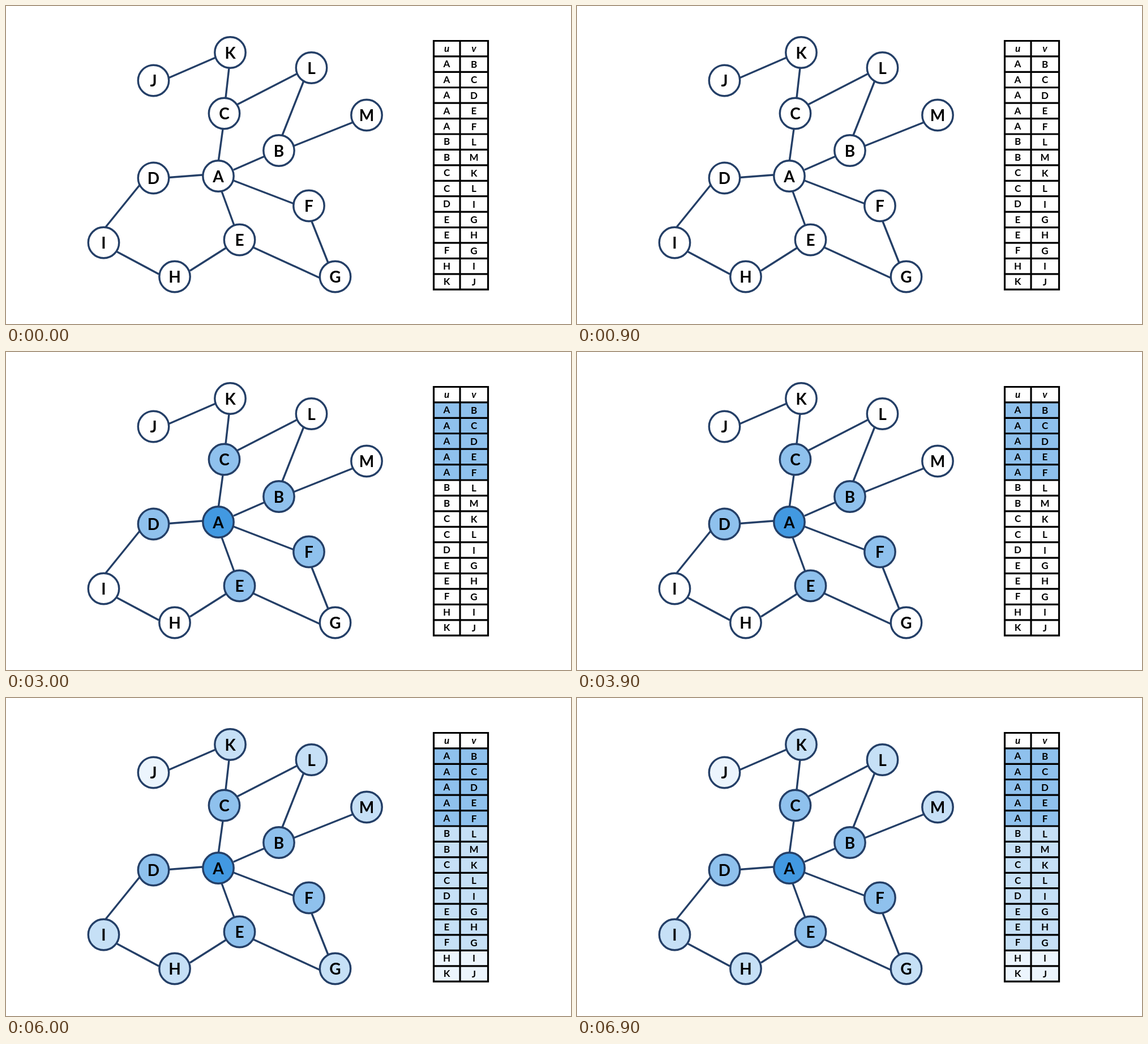
Animation of 998x561 px, one loop 7.5 s. Source, as an HTML page:

```html
<!DOCTYPE html>
<html lang="en">
<head>
<meta charset="utf-8">
<title>Breadth-first search</title>
<style>
  html, body { margin: 0; width: 100%; height: 100%; overflow: hidden; background: #fff; }
  svg { display: block; width: 100%; height: 100%; }
  text { font: 700 28px Lato, sans-serif; text-anchor: middle; }
  .cell { font-size: 17px; }
  .head { font-style: italic; }
  .ink { stroke: #243f67; stroke-width: 3.4; }
  .grid { stroke: #000; stroke-width: 3.2; fill: none; }
</style>
</head>
<body>
<svg id="stage" viewBox="0 0 998 561"></svg>
<script>
const STEP = 1500, STEPS = 5;
const LEVEL_FILLS = ['#4299e1', '#8fc1ed', '#c6e0f6', '#ecf5fd'];
const LEVELS = ['A', 'BCDEF', 'GHIKLM', 'J'];

const nodes = {
  A: [375, 300], B: [482, 255], C: [385.5, 189.5], D: [260.5, 303.5],
  E: [412.5, 412.5], F: [535, 352.5], G: [581.5, 477.5], H: [298, 477.5],
  I: [172.5, 417.5], J: [260.5, 131.5], K: [396, 82], L: [539.5, 109], M: [637, 192.5]
};

// Edge ends sit on the node rims, in table order.
const edges = [
  ['AB', 402, 289, 457, 265], ['AC', 375.5, 272, 383, 217],
  ['AD', 347, 298, 288, 302.5], ['AE', 381, 327, 403, 387],
  ['AF', 402, 308, 509, 349], ['BL', 488, 228, 526, 132],
  ['BM', 509, 246.5, 612, 205.5], ['CK', 388, 162, 394, 109],
  ['CL', 408, 174, 515, 119], ['DI', 236, 316, 176, 390],
  ['EG', 437, 426, 555, 480], ['EH', 389, 426.5, 325, 467],
  ['FG', 540, 380, 569, 453], ['HI', 270, 473, 195, 433],
  ['KJ', 370, 91, 288, 126.5]
];

const table = { left: 755.5, mid: 802, right: 851.5, top: 61.5, row: 27.42 };
const stage = document.getElementById('stage');
const painted = [];

function add(tag, attrs, text = '') {
  const el = document.createElementNS('http://www.w3.org/2000/svg', tag);
  for (const key in attrs) el.setAttribute(key, attrs[key]);
  el.textContent = text;
  stage.append(el);
  return el;
}

const levelOf = name => LEVELS.findIndex(names => names.includes(name));
const paintable = (el, level) => painted.push({ el, level });

function drawGraph() {
  for (const [, x1, y1, x2, y2] of edges) add('line', { class: 'ink', x1, y1, x2, y2 });
  for (const [name, [cx, cy]] of Object.entries(nodes)) {
    paintable(add('circle', { class: 'ink', cx, cy, r: 27.2 }), levelOf(name));
    add('text', { x: cx, y: cy + 10.6 }, name);
  }
}

function drawTable() {
  const { left, mid, right, top, row } = table;
  const rows = ['uv', ...edges.map(edge => edge[0])];
  const bottom = top + row * rows.length;
  rows.forEach(([u, v], i) => {
    const y = top + row * i;
    if (i) {
      const rect = add('rect', { x: left, y, width: right - left, height: row });
      paintable(rect, Math.max(levelOf(u) + 1, levelOf(v)) );
    }
    const style = i ? 'cell' : 'cell head';
    add('text', { class: style, x: 778.5, y: y + 19.4 }, u);
    add('text', { class: style, x: 826.5, y: y + 19.9 }, v);
  });
  let path = `M${left} ${top}H${right}V${bottom}H${left}ZM${mid} ${top}V${bottom}`;
  for (let i = 1; i < rows.length; i++) path += `M${left} ${top + row * i}H${right}`;
  add('path', { class: 'grid', d: path });
}

function render(time) {
  const step = Math.floor(time / STEP) % STEPS;
  for (const { el, level } of painted) {
    el.setAttribute('fill', level < step ? LEVEL_FILLS[level] : '#fff');
  }
}

drawGraph();
drawTable();
const start = performance.now();
function tick() {
  render(performance.now() - start);
  requestAnimationFrame(tick);
}
render(0);
requestAnimationFrame(tick);
</script>
</body>
</html>
```
